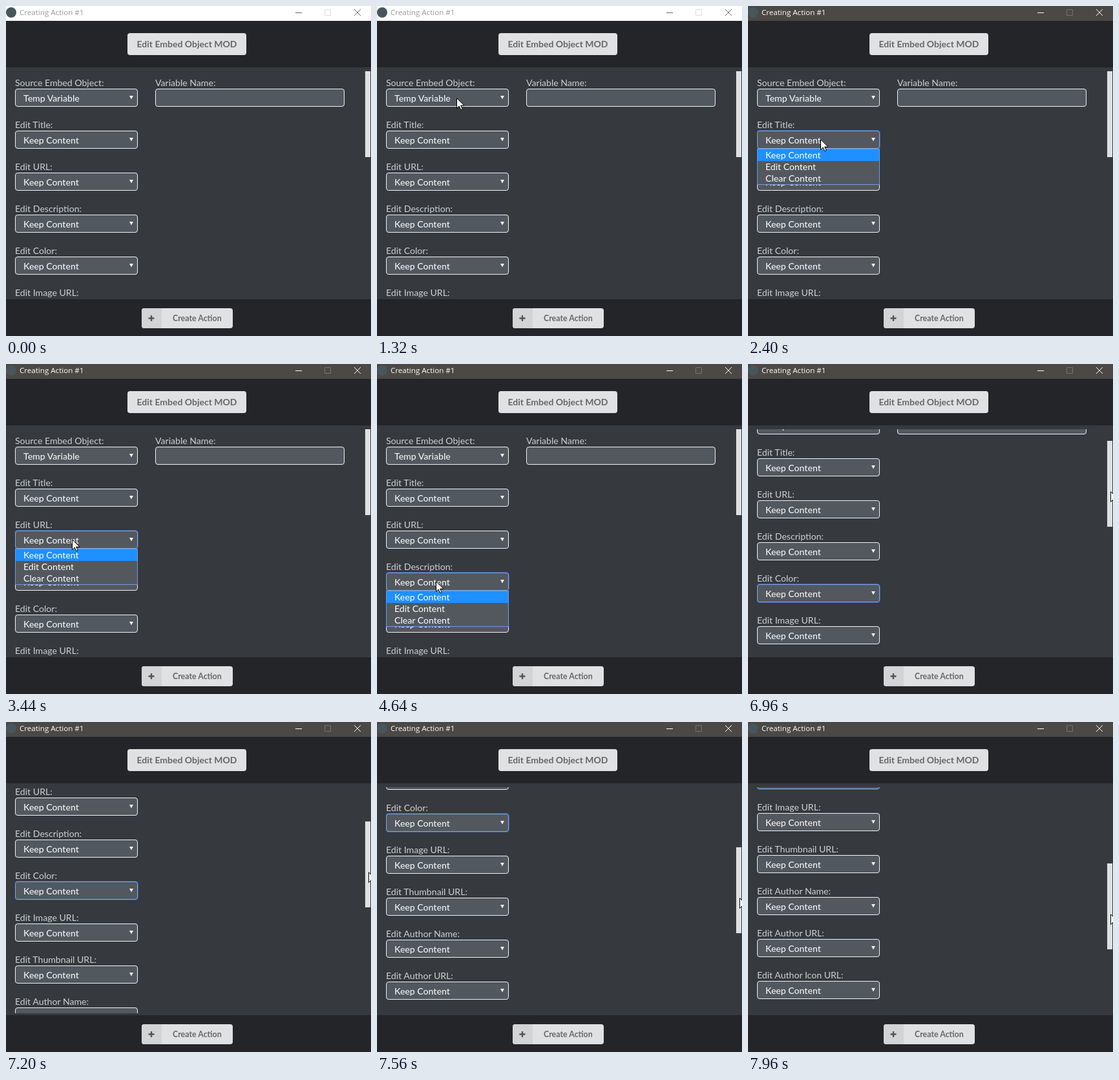
An HTML page that plays this animation: 565 px wide and 511 px high, repeating every 8 s.

```html
<!DOCTYPE html>
<html lang="en">
<head>
<meta charset="utf-8">
<title>Creating Action</title>
<style>
html, body { margin: 0; width: 100%; height: 100%; overflow: hidden; }
body { position: relative; background: #36393e; font: 14.1px Lato, sans-serif; cursor: default; }
div, span, svg { position: absolute; box-sizing: border-box; white-space: nowrap; }
#bar { left: 0; top: 0; width: 565px; height: 23px; background: #fff; color: #999; --line: #666; --dim: #ddd; }
#bar.active { background: #4b4845; color: #fff; --line: #fff; --dim: #74716e; }
#bar span { left: 21px; top: 0; font: 11.6px/20px "Open Sans", sans-serif; }
#icon { left: 0; top: 2px; width: 16px; height: 16px; border-radius: 50%; background: #47565c; }
#bar path { fill: none; stroke: var(--line); }
#bar .dim { stroke: var(--dim); }
.strip { left: 0; width: 565px; background: #242529; }
.button { background: #e0e1e2; color: #676768; border-radius: 4px; font-weight: bold; overflow: hidden; }
#view { inset: 0; clip-path: inset(101px 0 60px 14px); }
#list { inset: 0; }
.label { left: 14px; line-height: 20px; color: #cfd0d2; }
.box { left: 14px; width: 190px; height: 28px; border: 1px solid #f2f2f2; border-radius: 4px;
  background: #53585f; color: #f2f2f2; font-weight: 500; line-height: 28px; padding-left: 12px; }
.box.focus { border-color: #7ea6ea; box-shadow: 0 0 0 1px #4678d28c; }
.box svg { left: 175px; top: 10px; }
#popup { left: 14px; width: 190px; height: 56px; border: 1px solid #6f9be0; background: #53585f; color: #fff; }
#popup div { left: 0; width: 188px; height: 18px; line-height: 18px; padding-left: 12px; }
#popup div:first-child { background: #1e90ff; }
#thumb { left: 556px; top: 101px; width: 8px; height: 133px; background: #dfe0e2; }
#cursor { left: 0; top: 0; }
</style>
</head>
<body>
<div class="strip" style="top:23px;height:72px"></div>
<div class="strip" style="top:454px;height:57px"></div>
<div class="button" style="left:188px;top:42px;width:184px;height:34px;font-size:14px;line-height:34px;text-align:center">Edit Embed Object MOD</div>
<div class="button" style="left:210px;top:468px;width:141px;height:31px;font-size:12.4px;line-height:31px">
  <div style="left:0;top:0;width:31px;height:31px;background:#d3d4d5"></div>
  <svg width="31" height="31"><path d="M15 11v9M10.500 15.500h9" stroke="#555" stroke-width="2.400"/></svg>
  <span style="left:48px">Create Action</span>
</div>
<div id="view"><div id="list"></div></div>
<div id="thumb"></div>
<div id="popup"></div>
<div id="bar">
  <div id="icon"></div>
  <span>Creating Action #1</span>
  <svg width="565" height="23">
    <path d="M448 10.500h10M539 5l10 10M549 5l-10 10"/>
    <path class="dim" d="M493.500 5.500h9v9h-9z"/>
  </svg>
</div>
<svg id="cursor" width="14" height="21">
  <path d="M.5 .8V16.500L4.200 13l2.600 5.700 2.400-1-2.500-5.600H12z" fill="#fff" stroke="#000"/>
</svg>
<script>
const $ = id => document.getElementById(id);
const LOOP = 8000, TICK = 40, SCROLL_RATIO = 2.65;
const boxTop = i => 128 + i * 65;

const names = ['Source Embed Object', ...['Title', 'URL', 'Description', 'Color', 'Image URL',
  'Thumbnail URL', 'Author Name', 'Author URL', 'Author Icon URL'].map(n => 'Edit ' + n)];
const sourceOptions = ['Temp Variable', 'Server Variable', 'Global Variable'];
const editOptions = ['Keep Content', 'Edit Content', 'Clear Content'];
const optionsOf = i => i ? editOptions : sourceOptions;

// When each of the first five menus opens and closes.
const menus = [[1400, 2000], [2360, 3000], [3400, 3880], [4240, 4960], [5360, 5960]];

// Pointer: reach a select, rest until shortly before its menu closes, pick the first option.
const legs = [];
let free = 280;
menus.forEach(([open, close], i) => {
  const x = 122.5 - 10.5 * i, y = boxTop(i) + 13;
  legs.push({ start: free, end: open - 40, x, y });
  legs.push({ start: close - 200, end: close - 40, x: x + 6, y: y + 30 });
  free = close + 160;
});
legs.push({ start: free, end: 6680, x: 561, y: 179 });

// Scrollbar drag: [time, thumb offset], straight in between.
const dragKeys = [[6840, 0], [7200, 53.2], [7560, 92.8], [7960, 117.8]];

const progress = (t, start, end) => Math.min(1, Math.max(0, (t - start) / (end - start)));

function pointerAt(t) {
  let x = 435, y = 512;
  for (const leg of legs) {
    const k = progress(t, leg.start, leg.end), eased = k * (2 - k);
    x += (leg.x - x) * eased;
    y += (leg.y - y) * eased;
  }
  return [x, y];
}

const dragAt = t => dragKeys.slice(1).reduce((sum, [end, to], i) => {
  const [start, from] = dragKeys[i];
  return sum + (to - from) * progress(t, start, end);
}, 0);

function add(parent, className, top, text) {
  const el = document.createElement('div');
  el.className = className;
  el.style.top = top + 'px';
  el.textContent = text;
  return parent.appendChild(el);
}

const boxes = names.map((name, i) => {
  add($('list'), 'label', boxTop(i) - 19, name + ':');
  const box = add($('list'), 'box', boxTop(i), optionsOf(i)[0]);
  box.innerHTML += '<svg width="8" height="8"><path d="M1 0h6L4 5.500z" fill="#f2f2f2"/></svg>';
  return box;
});
add($('list'), 'label', boxTop(0) - 19, 'Variable Name:').style.left = '231px';
Object.assign(add($('list'), 'box', boxTop(0), '').style, { left: '231px', width: '293px' });
const rows = [0, 1, 2].map(i => add($('popup'), '', i * 18, ''));

const move = (id, x, y) =>
  $(id).style.transform = `translate(${Math.round(x)}px, ${Math.round(y)}px)`;

function draw() {
  const t = Math.floor(performance.now() % LOOP / TICK) * TICK;
  const [x, y] = pointerAt(t), drag = dragAt(t);
  const focused = menus.filter(([open]) => t >= open).length - 1;
  const isOpen = focused >= 0 && t < menus[focused][1];

  move('cursor', x, y + drag);
  move('thumb', 0, drag);
  move('list', 0, -drag * SCROLL_RATIO);
  $('bar').className = focused >= 0 ? 'active' : '';
  boxes.forEach((box, i) => box.classList.toggle('focus', i === focused));
  $('popup').style.display = isOpen ? '' : 'none';
  $('popup').style.top = boxTop(focused) + 28 + 'px';
  rows.forEach((row, i) => row.textContent = optionsOf(focused)[i]);
  requestAnimationFrame(draw);
}
draw();
</script>
</body>
</html>
```
